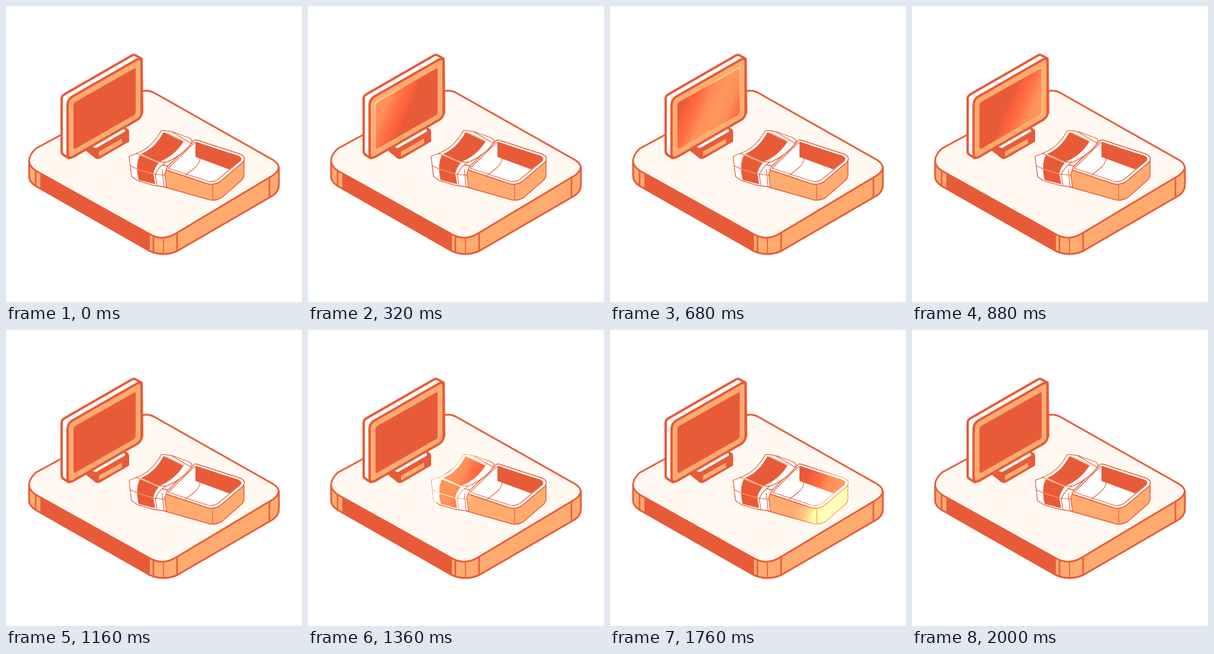
An HTML page with a canvas for the animation above (2640 ms loop, 500x500 px).

```html
<!DOCTYPE html>
<html lang="en">
<head>
<meta charset="utf-8">
<title>Isometric desk</title>
<style>
html, body { margin: 0; width: 100%; height: 100%; overflow: hidden; background: #fff; }
canvas { display: block; width: 100%; height: 100%; }
</style>
</head>
<body>
<canvas id="stage" width="500" height="500"></canvas>
<script>
const ctx = document.getElementById('stage').getContext('2d');
const RED = '#e85b38', ORANGE = '#ffab70', CREAM = '#fff9f2', WHITE = '#fff';
const LOOP = 2640, STEP = 40;

function shape(d, fill, line, width = 3) {
  const path = new Path2D(d);
  if (fill) { ctx.fillStyle = fill; ctx.fill(path); }
  if (line) { ctx.strokeStyle = line; ctx.lineWidth = width; ctx.stroke(path); }
}

function platform() {
  const body = 'M39 262V288Q39 297 50 304L243 414Q266 424 289 414L451 320Q461 313 461 302V272L266 300Z';
  shape(body, ORANGE);
  shape('M58 282L243 386V414L58 308Z', RED);
  shape(body, null, RED);
  shape('M50 278V304M249 388V416M289 383V414M445 290V323', null, RED, 2.6);
  shape('M266 392V419', null, RED, 1.6);
  shape('M50 241L223 147Q237 139 251 147L451 260Q470 272 451 286L289 383Q266 398 244 386L50 278Q28 263 50 241Z', CREAM, RED, 2.8);
}

function monitor() {
  shape('M133 243L198 205Q208 206 208 212V229L160 257Q153 261 147 254Z', RED);
  shape('M140 236L194 206Q202 207 201 212L152 240Z', WHITE);
  shape('M157 246L196 224V232L157 254Z', ORANGE);
  shape('M94 156Q94 152 99 149L212 84Q216 81 220 84L229 89L230 180L106 257L98 252Q94 250 94 246Z', WHITE, RED, 4);
  shape('M104 167Q104 158 112 153L222 90Q229 87 229 95V180Q229 187 222 192L113 255Q104 259 104 250Z', ORANGE, RED, 4);
  shape('M114 167Q114 164 117 162L216 106Q219 104 219 107V180Q219 182 217 184L117 241Q114 242 114 240Z', RED);
}

function tray() {
  shape('M268 276L340 300Q350 303 361 297L402 262V286Q402 291 395 297L364 324Q350 331 339 326L268 306Z', ORANGE, RED, 1.5);
  shape('M268 276L316 229Q319 225 324 227L395 250Q407 255 400 264L361 297Q350 303 340 300Z', WHITE, RED, 1.5);
  shape('M320 230Q320 229 323 230L392 253Q400 257 396 261L377 276L320 255Z', RED);
  shape('M274 274L318 231L392 253Q400 257 395 262L358 293Q350 298 341 296Z', null, RED, 1.2);
  shape('M328 258Q326 268 318 274L303 286M349 303V327', null, RED, 1.2);
}

function sleeve() {
  shape('M262 211Q266 209 283 213L310 223Q316 226 313 232Q296 254 270 264L273 270L268 284L271 306L250 303L222 295L212 288L208 255Q244 244 262 211Z', WHITE);
  shape('M266 213L300 229Q284 254 259 263L228 250Q252 240 266 213Z', RED);
  shape('M226 252L258 265Q249 276 249 284L252 301L224 294Q218 268 226 252Z', RED);
  shape('M262 211Q266 209 283 213L310 223Q316 226 313 232Q296 254 270 264L259 263L220 249L208 254L212 288L222 295L250 303L271 306L268 284L273 270L264 268', null, RED, 1.3);
  shape('M262 211Q246 240 220 249M281 213L313 232M210 270L221 275M250 284L269 286M270 264Q259 270 252 285L255 302M264 276L267 305', null, RED, 1.2);
  shape('M269 214L302 228M226 251L258 264M220 275L250 284', null, ORANGE, 1.2);
}

// A slanted band of light that brightens whatever lies inside the outline.
function shine(outline, x, y) {
  const dx = 52, dy = 22;
  const band = ctx.createLinearGradient(x - dx, y - dy, x + dx, y + dy);
  [0, 0.14, 0.36, 0.4, 0.36, 0.14, 0].forEach((v, i, all) => {
    const grey = Math.round(v * 255);
    band.addColorStop(i / (all.length - 1), `rgb(${grey},${grey},${grey})`);
  });
  ctx.save();
  ctx.clip(new Path2D(outline));
  ctx.globalCompositeOperation = 'color-dodge';
  ctx.fillStyle = band;
  ctx.fillRect(0, 0, 500, 500);
  ctx.restore();
}

const SCREEN = 'M113.5 163L219.5 103V183L113.5 243Z';
const LUNCHBOX = 'M262 208L285 211L319 225L398 249L405 258V290L365 327L348 331L270 308L210 290L206 253L240 240Z';

function draw(now) {
  const t = Math.floor(now % LOOP / STEP) * STEP;
  ctx.fillStyle = WHITE;
  ctx.fillRect(0, 0, 500, 500);
  ctx.lineJoin = ctx.lineCap = 'round';
  platform();
  monitor();
  tray();
  sleeve();
  if (t >= 160 && t < 1240) shine(SCREEN, 150 + (t - 520) * 0.195, 173);
  if (t >= 1120 && t < 2000) shine(LUNCHBOX, 230 + (t - 1360) * 0.39, 268);
}

let start;
function tick(now) {
  start ??= now;
  draw(now - start);
  requestAnimationFrame(tick);
}
draw(0);
requestAnimationFrame(tick);
</script>
</body>
</html>
```
